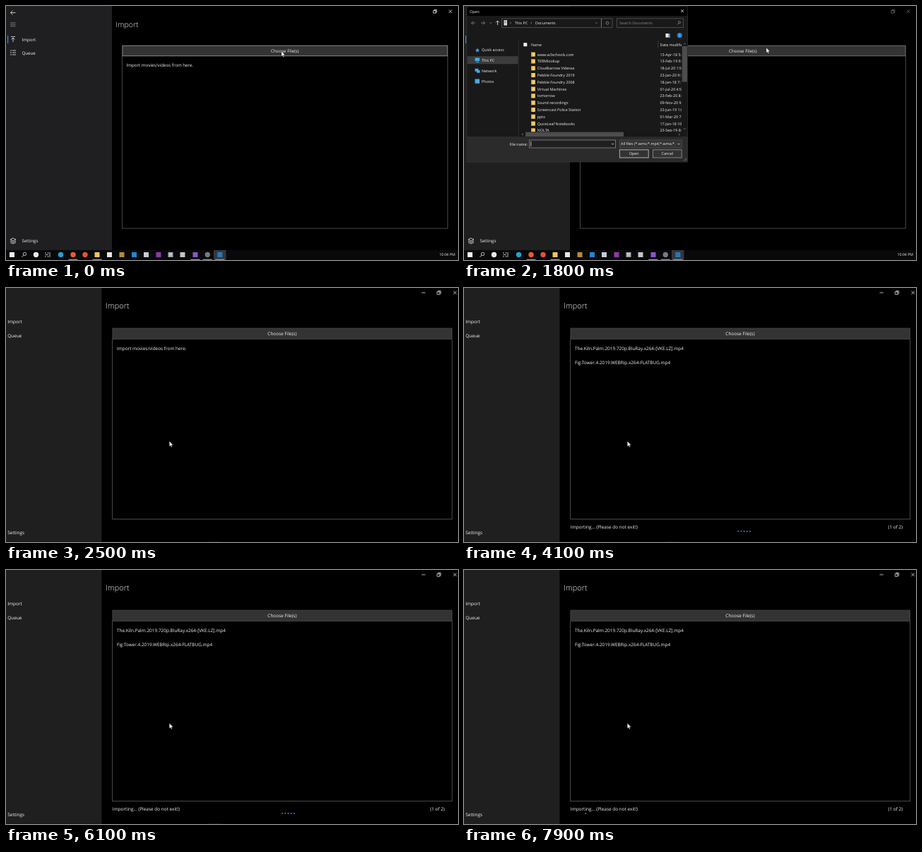
An HTML page that plays this animation: 640 px wide and 360 px high, repeating every 8000 ms.

```html
<!DOCTYPE html>
<html lang="en">
<head>
<meta charset="utf-8">
<title>Import</title>
<style>
html, body { margin: 0; width: 100%; height: 100%; overflow: hidden; background: #000; }
svg { display: block; width: 100vw; height: 100vh; }
text {
  font: 6.18px "Open Sans", "Noto Sans", sans-serif;
  fill: #f4f4f4; text-rendering: geometricPrecision; white-space: pre;
}
.title { font-size: 10.5px; font-weight: 300; }
.small text, .small { font-size: 5.35px; }
.clock { font-size: 5.2px; }
.line { fill: none; stroke: #ececec; stroke-width: .8; }
.grey { stroke: #8c8c8c; }
.dim { stroke: #555; }

/* scenes: idle, window inactive 1.1s, dialog 1.6s, zoom 2.2s, closed 2.5s, importing 2.8s */
.app, .dialog, .hint, .import, .caption, .minimize, .choose, .side {
  animation: 8s step-end infinite;
}
.app { animation-name: zoom; }
.dialog { animation-name: dialog; }
.hint { animation-name: hint; }
.import { animation-name: import; }
.caption { animation-name: caption; }
.minimize { animation-name: minimize; }
.choose { animation-name: choose; }
.side { animation-name: side; }
.cursor { animation: point 8s infinite; }
@keyframes zoom {
  0% { transform: none; }
  27.5%, 100% { transform: matrix(1.044, 0, 0, 1.044, -21.2, -1.5); }
}
@keyframes dialog {
  0% { visibility: hidden; }
  20% { visibility: visible; }
  31.25%, 100% { visibility: hidden; }
}
@keyframes hint { 0% { visibility: visible; } 35%, 100% { visibility: hidden; } }
@keyframes import { 0% { visibility: hidden; } 35%, 100% { visibility: visible; } }
@keyframes caption { 0% { opacity: 1; } 13.75% { opacity: .45; } 31.25%, 100% { opacity: 1; } }
@keyframes minimize { 0% { visibility: hidden; } 27.5%, 100% { visibility: visible; } }
@keyframes choose {
  0% { stroke: #8a8a8a; }
  12.5% { stroke: #707070; }
  31.25%, 100% { stroke: #444; }
}
@keyframes side { 0% { fill: #1f1f21; } 13.75%, 100% { fill: #1f1f1f; } }
@keyframes point {
  0%, 8.75% { transform: translate(390px, 64px); animation-timing-function: ease-in-out; }
  13.75%, 26% { transform: translate(428px, 59px); animation-timing-function: step-end; }
  27.5%, 100% { transform: translate(241.8px, 209.3px); }
}
</style>
</head>
<body>
<svg viewBox="0 0 640 360">
  <defs>
    <clipPath id="files"><rect x="78" y="48" width="230" height="130.5"/></clipPath>
    <clipPath id="filter"><rect x="221" y="190" width="78" height="11"/></clipPath>
  </defs>
  <rect width="640" height="360"/>
  <g class="app">
    <rect class="side" width="150" height="347"/>
    <rect x="2" y="42" width="1.2" height="11" fill="#3b8ee0"/>
    <path class="line" d="M13.5 9.5H6.5M9.5 6.5l-3 3l3 3"/>
    <path class="line grey" d="M6 23.8h7.5M6 26.2h7.5M6 28.6h7.5"/>
    <path class="line" d="M7 43.5h6M10 51v-6M7.6 47.4L10 45l2.4 2.4"/>
    <path class="line" d="M6 63h2M9 63h5M6 66h2M9 66h5M6 69h2M9 69h5"/>
    <path class="line" d="M10 329l4 2l-4 2l-4-2zM6 333l4 2l4-2M6 335l4 2l4-2"/>
    <text x="22.5" y="49.8">Import</text>
    <text x="22.5" y="68.6">Queue</text>
    <text x="22.5" y="335.4">Settings</text>
    <text class="title" x="155.6" y="29.6">Import</text>
    <g class="caption">
      <path class="line minimize" d="M584 7.7h5"/>
      <path class="line" d="M605 6.5h3.6v3.6H605zM606.3 6.3V5.3h3.5v3.6h-1M627 5.5l4.4 4.4M631.4 5.5L627 9.9"/>
    </g>
    <path class="line" d="M164.5 71V315.2H625.4V71" style="stroke:#666;stroke-width:.7"/>
    <rect class="choose" x="164.9" y="56.2" width="460.2" height="14.5" fill="#333" stroke-width="1"/>
    <text x="394.8" y="65.8" text-anchor="middle">Choose File(s)</text>
    <text class="hint" x="170.6" y="86">Import movies/videos from here.</text>
    <g class="import">
      <text x="170.6" y="86">The.Kiln.Palm.2019.720p.BluRay.x264-[VKE.LZ].mp4</text>
      <text x="170.6" y="104.8">Fig.Tower.4.2019.WEBRip.x264-FLATBUG.mp4</text>
      <text x="164.8" y="327.8">Importing... (Please do not exit!)</text>
      <text x="615.3" y="327.8" text-anchor="end">(1 of 2)</text>
      <g id="dots" fill="#4a8fdc"></g>
    </g>

    <g id="taskbar">
      <rect y="346" width="640" height="15" fill="#08090b"/>
      <rect x="294" y="346" width="17.5" height="14" fill="#34373b"/>
    </g>

    <g class="dialog small">
      <rect x="4" y="1" width="312.5" height="220" fill="#202020" stroke="#4a4a4a" stroke-width=".6"/>
      <rect x="4.3" y="1.3" width="312" height="13" fill="#000"/>
      <rect x="4.3" y="14" width="312" height="171" fill="#191919"/>
      <rect x="4.3" y="185" width="312" height="35.7" fill="#2b2b2b"/>
      <text x="8" y="9.6">Open</text>
      <path class="line" d="M307.2 5.2l4 4M311.2 5.2l-4 4"/>
      <path class="line grey" d="M16 24h-5.5M13 21.5L10.5 24l2.5 2.5M24 24h5.5M27 21.5l2.5 2.5L27 26.5M36.5 23.3l1.4 1.4l1.4-1.4"/>
      <path class="line" d="M47.5 27v-6M45 23.5l2.5-2.5l2.5 2.5"/>
      <rect class="line dim" x="53.5" y="17.8" width="156.5" height="12.6"/>
      <rect class="line dim" x="216.5" y="17.8" width="94" height="12.6"/>
      <path d="M56.5 20h4.5v7.5h-4.5z" fill="#ddd"/>
      <path d="M57.5 21.5h2.5M57.5 23.5h2.5" stroke="#444" stroke-width=".7"/>
      <path class="line grey" d="M65.3 22.7l1.3 1.3l-1.3 1.3M94.6 22.7l1.3 1.3l-1.3 1.3M186 23.3l1.5 1.5l1.5-1.5M194.5 18v12"/>
      <circle class="line grey" cx="203" cy="24.2" r="1.9"/>
      <text x="72" y="26">This PC</text>
      <text x="101" y="26">Documents</text>
      <text x="220" y="26" style="fill:#8a8a8a">Search Documents</text>
      <path class="line grey" d="M302 26.5l2-2"/><circle class="line grey" cx="305" cy="23.2" r="1.6"/>
      <path d="M285.5 39h6.5v5.5h-6.5z" fill="#eee"/><path d="M289.5 39h2.5v5.5h-2.5z" fill="#398bd4"/>
      <circle cx="305.3" cy="41.6" r="3.6" fill="#1686d9"/>
      <text x="304" y="43.7">?</text>

      <rect x="4.5" y="71.2" width="72" height="11" fill="#3c3c3c"/>
      <path d="M16 62l2-.5l1-2l1 2l2 .5l-1.5 1.5l.4 2l-1.9-1l-1.9 1l.4-2z" fill="#3d9be0"/>
      <path d="M15.5 73.5h6.5v4.5h-6.5zM17 79h4v1h-4zM15.5 88.7h5v4h-5zM18 91h4.5v3.7H18zM15.5 103.5h6.5v6.2h-6.5z" fill="#49a9e6"/>
      <text x="25" y="64">Quick access</text>
      <text x="25" y="79">This PC</text>
      <text x="25" y="94.2">Network</text>
      <text x="25" y="109">Photos</text>
      <path d="M77.5 48v137" stroke="#333" stroke-width=".6"/>
      <rect x="84.3" y="52.2" width="5" height="5" fill="#f0f0f0"/>
      <text x="95" y="57">Name</text>
      <g id="list" clip-path="url(#files)"><text x="277.5" y="57">Date modified</text></g>
      <path d="M274.8 49v10" stroke="#555" stroke-width=".6"/>

      <rect x="308.7" y="48" width="7.4" height="130" fill="#171717"/>
      <rect x="308.9" y="57" width="7" height="50.5" fill="#4d4d4d"/>
      <rect x="78.5" y="178.5" width="230" height="6.8" fill="#171717"/>
      <rect x="87" y="178.7" width="139" height="6.3" fill="#4d4d4d"/>
      <path class="line grey" d="M311 54.2l1.4-1.4l1.4 1.4M311 173.5l1.4 1.4l1.4-1.4M83.5 180.5L82 182l1.5 1.5M304 180.5l1.5 1.5l-1.5 1.5"/>

      <text x="90" y="197.5" text-anchor="end">File name:</text>
      <rect x="92.6" y="190" width="122" height="11" fill="#202020" stroke="#888" stroke-width=".8"/>
      <path class="line" d="M94.8 192v7M209 194.8l1.5 1.5l1.5-1.5M302.5 194.8l1.5 1.5l1.5-1.5"/>
      <rect x="220.4" y="190" width="87.8" height="11" fill="#333" stroke="#555" stroke-width=".7"/>
      <path class="line" d="M302.5 194.8l1.5 1.5l1.5-1.5"/>
      <g clip-path="url(#filter)"><text x="222" y="197.4">All files (*.wmv;*.mp4;*.wma;*.avi)</text></g>
      <rect x="220.4" y="203.8" width="40.8" height="11.2" fill="#333" stroke="#b0b0b0"/>
      <rect x="267.4" y="203.8" width="40.8" height="11.2" fill="#333" stroke="#999" stroke-width=".8"/>
      <text x="240.8" y="211.3" text-anchor="middle">Open</text>
      <text x="287.8" y="211.3" text-anchor="middle">Cancel</text>
      <path d="M311 219.5l4-4M313 219.5l2-2" stroke="#888" stroke-width=".7"/>
    </g>

    <path class="cursor" d="M0 0V7.4L1.7 5.9L2.8 8.4L4 7.9L2.9 5.4H5.2Z" fill="#fff" stroke="#000" stroke-width=".4"/>
  </g>
</svg>
<script>
const LOOP = 8000;

function add(parent, tag, attrs, text) {
  const node = document.createElementNS("http://www.w3.org/2000/svg", tag);
  for (const name in attrs) node.setAttribute(name, attrs[name]);
  if (text) node.textContent = text;
  parent.append(node);
  return node;
}

// File list
const folders = [
  ["www.w3schools.com", "13-Apr-18 5:10"],
  ["TERMlookup", "13-Feb-19 9:24"],
  ["Cloudbarrow Videssa", "18-Jul-20 1:52"],
  ["Pebble Foundry 2019", "23-Jan-20 9:31"],
  ["Pebble Foundry 2008", "18-Jan-18 7:15"],
  ["Virtual Machines", "01-Jul-20 4:56"],
  ["tomorrow", "23-Feb-20 8:40"],
  ["Sound recordings", "09-Nov-20 9:12"],
  ["Screencast Police Station", "23-Jun-19 1:08"],
  ["pptx", "01-Mar-20 7:33"],
  ["QuireLeaf Notebooks", "17-Jan-18 10:2"],
  ["NOLTA", "23-Sep-19 8:17"]
];
const list = document.getElementById("list");
folders.forEach(([name, date], i) => {
  const y = 68.6 + i * 9.8;
  add(list, "rect", { x: 95.2, y: y - 3, width: 5.6, height: 6, fill: "#f3cf6b" });
  add(list, "rect", { x: 95.2, y: y - 3, width: 1.5, height: 6, fill: "#d9a93c" });
  add(list, "text", { x: 103.8, y: y + 2 }, name);
  add(list, "text", { x: 277.5, y: y + 2 }, date);
});

// Taskbar
const bar = document.getElementById("taskbar");
const square = (x, fill) => add(bar, "rect", { x: x - 3.5, y: 349, width: 7, height: 7, fill });
const disc = (x, fill) => add(bar, "circle", { cx: x, cy: 352.5, r: 3.7, fill });
const stroke = d => add(bar, "path", { d, class: "line" });
square(8.5, "#f2f2f2");
add(bar, "circle", { cx: 26.5, cy: 351.5, r: 2.2, class: "line" });
stroke("M25 353.2l-2.5 2.7");
disc(42.5, "#e8e8e8");
stroke("M56 349v2M56 354v2M55.5 352.5h4M59.5 349v2M59.5 354v2M62 349v7");
disc(77.5, "#1fa3cf");
disc(95, "#ef5a2c");
disc(112, "#e4503c");
square(129, "#f0c657");
square(146.5, "#e6e6e6");
square(164, "#b98a35");
square(181.5, "#2189d0");
square(198.5, "#c8ccd0");
square(216, "#8f3aa8");
square(233, "#a4a8ac");
stroke("M231 351h4M231 353h4");
square(250, "#c6c6c6");
square(268, "#8a55c8");
disc(285.3, "#777a7e");
square(302.8, "#2678b8");
[95, 129, 268, 285.3, 302.8].forEach(x =>
  add(bar, "rect", { x: x - 6.5, y: 358.8, width: 13, height: 1.2, fill: "#5f9fdf" }));
add(bar, "text", { x: 636, y: 354.3, "text-anchor": "end", class: "clock" }, "10:04 PM");

// Indeterminate progress: each dot runs to a resting point, waits, runs on,
// while the whole row drifts slowly to the right.
const CYCLE = 3.917, SPEED = 7.86, WIDTH = 461, LEFT = 164;
const dots = Array.from({ length: 5 }, () =>
  add(document.getElementById("dots"), "circle", { cy: 331.8, r: .9 }));
const ease = p => p < .5 ? 16 * p ** 5 : 1 - 16 * (1 - p) ** 5;

function travel(s) {
  if (s < 1) return ease(s) / 3;
  if (s < 2) return 1 / 3;
  return (1 + ease(Math.min(s - 2, 1))) / 3;
}

let start;
function draw(now) {
  start ??= now;
  const t = (now - start) % LOOP;
  const raw = (t - 4100) / 1000 * SPEED + 1.805;
  const phase = (raw % CYCLE + CYCLE) % CYCLE;
  dots.forEach((dot, i) => {
    const s = phase - i / 6;
    const x = WIDTH * travel(s) - 16 + 54.6 * phase + 8 - 4 * i;
    dot.setAttribute("cx", LEFT + x);
    dot.setAttribute("opacity", s > .2 && s < 3 && x < WIDTH ? 1 : 0);
  });
  requestAnimationFrame(draw);
}
requestAnimationFrame(draw);
</script>
</body>
</html>
```
